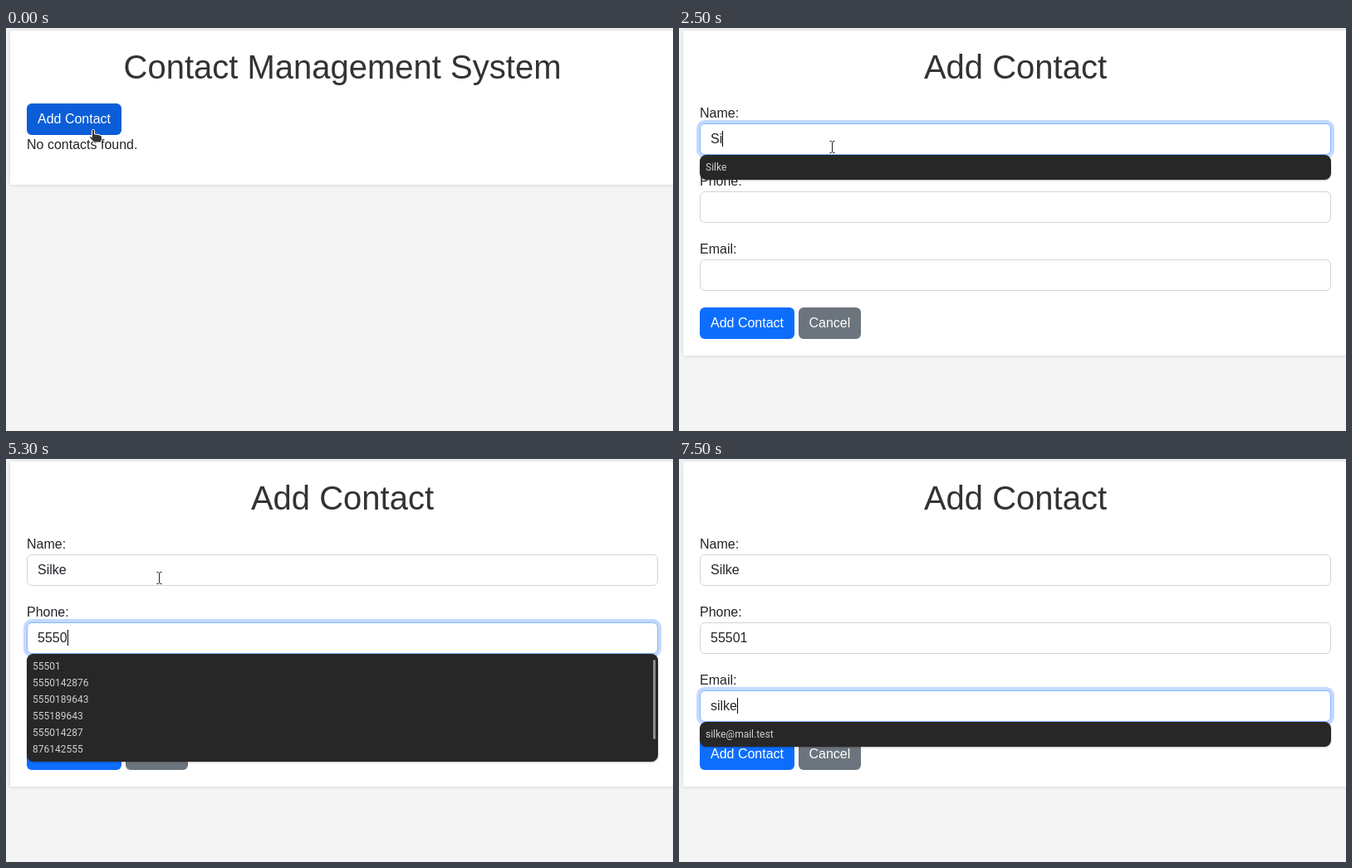
An HTML page for the animation above (8000 ms loop, 803 by 486 pixels).

```html
<!DOCTYPE html>
<html lang="en">
<head>
<meta charset="utf-8">
<title>Contact form</title>
<style>
* { box-sizing: border-box; }
html, body { margin: 0; width: 100%; height: 100%; overflow: hidden; }
body { position: relative; background: #f4f4f4; color: #212529; font: 16px/24px "Liberation Sans", Arial, sans-serif; }
.card { position: absolute; left: 5px; top: 3px; width: 800px; padding: 20px; background: #fff; box-shadow: 0 0 5px rgba(0,0,0,.14); }
h1 { margin: 0 0 20px; font-size: 40px; line-height: 48px; font-weight: 400; text-align: center; color: #333; }
p { margin: 0 0 16px; }
.row { display: flex; gap: 4.45px; }
.btn { height: 38px; padding: 6px 12px; border: 1px solid transparent; border-radius: 6px; color: #fff; background: #0d6efd; background-clip: border-box; white-space: nowrap; }
.hover { background: #0b5ed7; }
.grey { background: #6c757d; }
.field { position: relative; margin-bottom: 20px; }
.input { height: 38px; padding: 6px 12px; border: 1px solid; border-radius: 6px; background: #fff; white-space: pre; }
.caret { display: inline-block; width: 1px; height: 19px; margin-right: -1px; vertical-align: -4px; background: #000; }
.list { position: absolute; z-index: 1; left: 0; top: 62px; width: 760px; max-height: 130px; padding: 5px 2px; overflow: hidden;
  border-radius: 8px; background: #272727; color: #d0d0d0; box-shadow: 0 1px 2px rgba(0,0,0,.25); font: 12px/20px Roboto, "Noto Sans", sans-serif; }
.list div { height: 20px; padding: 0 5px; border-radius: 4px; }
.list .picked { background: #4c4c4c; }
.list i { position: absolute; right: 3px; top: 7px; width: 3px; height: 96px; border-radius: 2px; background: #8c8c8c; }
svg { position: absolute; left: 0; top: 0; z-index: 2; overflow: visible; }
</style>
</head>
<body>
<div class="card" id="home">
  <h1>Contact Management System</h1>
  <div class="row"><div class="btn hover" id="add">Add Contact</div></div>
  <p>No contacts found.</p>
</div>
<div class="card" id="form">
  <h1>Add Contact</h1>
  <div id="fields"></div>
  <div class="row"><div class="btn">Add Contact</div><div class="btn grey">Cancel</div></div>
</div>
<svg id="pointer" width="1" height="1">
  <path id="hand" d="M-1.5 2.5Q0 -.5 1.5 2.5V7Q8 7 10.5 9.5V13.5L9 17H1L-4.5 11Q-4 8.5 -1.5 10.5Z" fill="#333" stroke="#fff"/>
  <g id="beam" fill="none">
    <path d="M-3 -6.5H3M-3 7.5H3M0 -6.5V7.5" stroke="#fff" stroke-width="3"/>
    <path d="M-3 -6.5H-1L0 -5.5L1 -6.5H3M-3 7.5H-1L0 6.5L1 7.5H3M0 -5.5V6.5" stroke="#222"/>
  </g>
</svg>
<script>
const LOOP = 8000, PAGE_LOAD = 300;
const $ = id => document.getElementById(id);

// focus, open: [start, end]; typed: [time, text]
const fields = [
  { label: "Name", focus: [1200, 3900], open: [1700, 3600], picked: 3300,
    typed: [[1700, "S"], [2400, "Si"], [3600, "Silke"]],
    options: ["Silke", "Sanne", "Stina"] },
  { label: "Phone", focus: [3900, 5900], open: [4300, 5900], blink: [5100, 5300],
    typed: [[4300, "5"], [4500, "55"], [4700, "555"], [5300, "5550"], [5500, "55501"]],
    options: ["55501", "5550142876", "5550189643", "555189643", "555014287", "876142555", "643555189"] },
  { label: "Email", focus: [5900, LOOP], open: [7000, LOOP],
    typed: [[7000, "s"], [7200, "si"], [7300, "sil"], [7400, "silk"], [7500, "silke"]],
    options: ["silke@mail.test", "sanne@mail.test", "stina@mail.test"] }
];

const during = (t, span) => !!span && t >= span[0] && t < span[1];
const clamp = x => Math.max(0, Math.min(1, x));
const ease = x => x * x * (3 - 2 * x);
const ramp = (t, start) => t < start ? 0 : ease(clamp((t - start + 50) / 200));
const mix = (a, b, k) => a + (b - a) * k;
const textAt = (f, t) => f.typed.reduce((s, [at, text]) => t >= at ? text : s, "");

function listHtml(f, t) {
  if (!during(t, f.open)) return "";
  // Suggestions follow the typed text one tick later
  const key = textAt(f, t - 100).toLowerCase();
  const found = f.options.filter(o => o.toLowerCase().includes(key));
  const clip = t < f.open[0] + 100 ? "clip-path:inset(-2px -2px calc(100% - 14px))" : "";
  const rows = found.map((o, i) => `<div class="${i === 0 && t >= f.picked ? "picked" : ""}">${o}</div>`).join("");
  return `<div class="list" style="${clip}">${rows}${found.length > 6 ? "<i></i>" : ""}</div>`;
}

function fieldHtml(f, t) {
  const k = ramp(t, f.focus[0]) - ramp(t, f.focus[1]);
  const border = [[206, 134], [212, 183], [218, 254]].map(([a, b]) => mix(a, b, k));
  const ring = `0 0 0 ${4 * k}px rgba(13,110,253,${.25 * k})`;
  const caret = during(t, f.focus) && !during(t, f.blink) ? '<span class="caret"></span>' : "";
  return `<div class="field">${f.label}:<div class="input" style="border-color:rgb(${border});box-shadow:${ring}">` +
    `${textAt(f, t)}${caret}</div>${listHtml(f, t)}</div>`;
}

function draw(t) {
  const onForm = t >= PAGE_LOAD;
  $("home").style.display = onForm ? "none" : "";
  $("form").style.display = onForm ? "" : "none";
  const press = ramp(t, 100);
  $("add").style.boxShadow = `0 0 0 ${4 * press}px rgba(49,132,253,${.5 * press})`;
  $("fields").innerHTML = fields.map(f => fieldHtml(f, t)).join("");

  const move = ease(clamp((t - PAGE_LOAD) / 500)), settle = clamp((t - 900) / 200);
  const x = Math.round(mix(105, 184, move)) + (onForm ? .5 : 0);
  const y = Math.round(mix(mix(121, 152, move), 143, settle));
  $("pointer").style.display = t < 5900 ? "" : "none";
  $("hand").style.display = onForm ? "none" : "";
  $("beam").style.display = onForm ? "" : "none";
  $("pointer").style.transform = `translate(${x}px,${y}px)`;
}

let last = -1;
function tick() {
  const t = Math.floor(performance.now() % LOOP / 100) * 100;
  if (t !== last) draw(last = t);
  requestAnimationFrame(tick);
}
tick();
</script>
</body>
</html>
```
